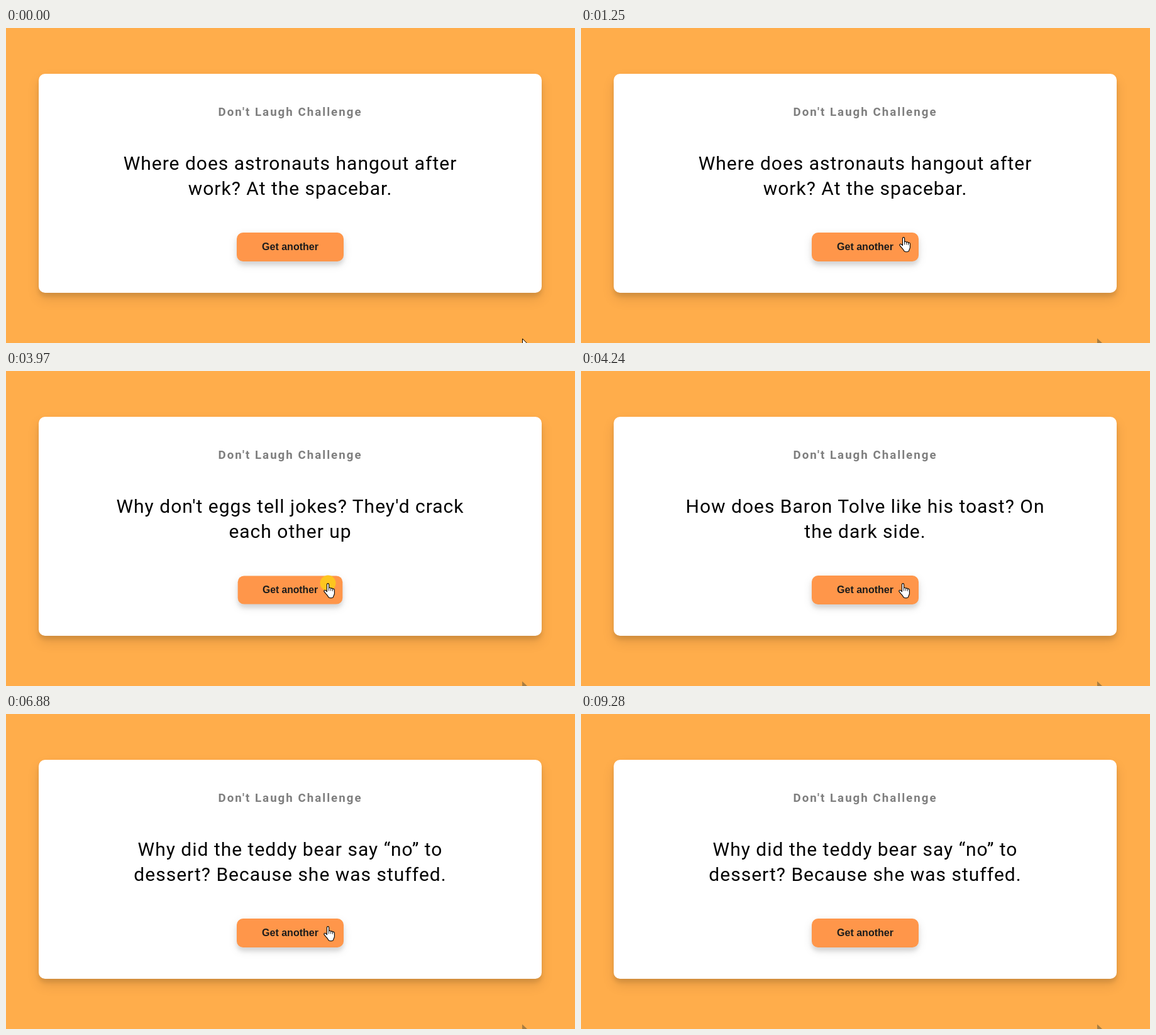
An HTML page for the animation above (9420 ms loop, 905x502 px).

```html
<!DOCTYPE html>
<html lang="en">
<head>
<meta charset="utf-8">
<title>Don't Laugh Challenge</title>
<style>
  html, body { margin: 0; width: 100%; height: 100%; overflow: hidden; background: #ffad4b; }
  .card {
    position: absolute; left: 52px; top: 73px; width: 800px; height: 349px;
    background: #fff; border-radius: 10px; text-align: center;
    font-family: Roboto, sans-serif;
    box-shadow: 0 10px 20px rgba(0, 0, 0, .1), 0 6px 6px rgba(0, 0, 0, .1);
  }
  h3 { margin: 50px 0; font-size: 18.72px; line-height: 23px; letter-spacing: 2px; opacity: .5; }
  .joke { height: 80px; font-size: 30px; line-height: 40px; letter-spacing: 1px; white-space: pre-line; }
  .button {
    position: absolute; left: 315px; top: 253px; width: 170px; height: 46px;
    background: #ff964a; border-radius: 10px; color: #1c1c1c;
    font: bold 16px/46px "Liberation Sans", Arial, sans-serif;
    box-shadow: 0 5px 15px rgba(0, 0, 0, .1), 0 6px 6px rgba(0, 0, 0, .1);
  }
  svg { position: absolute; left: 0; top: 0; }
</style>
</head>
<body>
<div class="card">
  <h3>Don't Laugh Challenge</h3>
  <div class="joke" id="joke"></div>
  <div class="button" id="button">Get another</div>
</div>
<svg width="905" height="502">
  <path id="trace" d="M821 494.5V502H829Z" fill="#a97d40"/>
  <g id="pointer" stroke="#000" fill="#fff" stroke-linejoin="round" stroke-linecap="round">
    <circle id="click" r="12.5" fill="#fdc51f" stroke="none"/>
    <path id="arrow" d="M.5 .5V16.5L4.2 13 6.7 18.6 9 17.6 6.6 12H11.6Z"/>
    <g id="hand" transform="translate(-7 0)">
      <path stroke-width="1.1" d="M5.5 2.3C5.5 .1 8.6 .1 8.6 2.3V8.2C9 6.8 11.6 7 11.7 8.8 12.2 7.6 14.5 7.9 14.6 9.6 15.2 8.7 17.4 9 17.4 10.8V16.5C17.4 18.5 16 19.8 15.7 21.5 15.4 24.4 8.2 24.4 7.4 21.6 6.8 19.8 3.4 17 1 13.4 .1 11.5 2.5 10.5 3.9 12L5.5 13.7Z"/>
      <path fill="none" stroke-width=".9" d="M8.6 8V12M11.7 9V12M14.6 10V12.5"/>
    </g>
  </g>
</svg>
<script>
const LOOP = 9420;
const $ = id => document.getElementById(id);

const jokes = [
  [0, "Where does astronauts hangout after\nwork? At the spacebar."],
  [1580, "Why don't eggs tell jokes? They'd crack\neach other up"],
  [4240, "How does Baron Tolve like his toast? On\nthe dark side."],
  [6880, "Why did the teddy bear say “no” to\ndessert? Because she was stuffed."]
];
const presses = [[1180, 1250], [3970, 4100], [6620, 6750]];
const rests = [
  [0, 821, 495], [320, 512, 332], [650, 513, 333],
  [1580, 518, 341], [1910, 512, 339], [2240, 512, 338]
];

const latest = (list, t) => list.filter(item => item[0] <= t).pop();
const show = (id, on) => $(id).style.display = on ? "" : "none";

function pointerAt(t) {
  if (t >= 70 && t < 320) {
    const left = (1 - (Math.floor((t - 70) / 62.5) + 1) / 5) ** 1.5;
    return [512 + 309 * left, 332 + 163 * left];
  }
  if (t >= 8530) {
    const p = (Math.min(8, Math.floor((t - 8530) / 70) + 1) / 8) ** 1.65;
    return [512 + 432 * p, 338 + 195 * p];
  }
  return latest(rests, t).slice(1);
}

function draw() {
  const t = performance.now() % LOOP;
  const [x, y] = pointerAt(t);
  const pressed = presses.some(([from, to]) => t >= from && t < to);
  const overButton = x >= 367 && x <= 537 && y >= 326 && y <= 372;

  const text = latest(jokes, t)[1];
  if ($("joke").textContent !== text) $("joke").textContent = text;
  $("button").style.transform = pressed ? "scale(.98)" : "";
  $("pointer").setAttribute("transform", `translate(${Math.round(x)} ${Math.round(y)})`);
  show("click", pressed);
  show("hand", overButton);
  show("arrow", !overButton);
  show("trace", t >= 70);
  requestAnimationFrame(draw);
}
draw();
</script>
</body>
</html>
```
